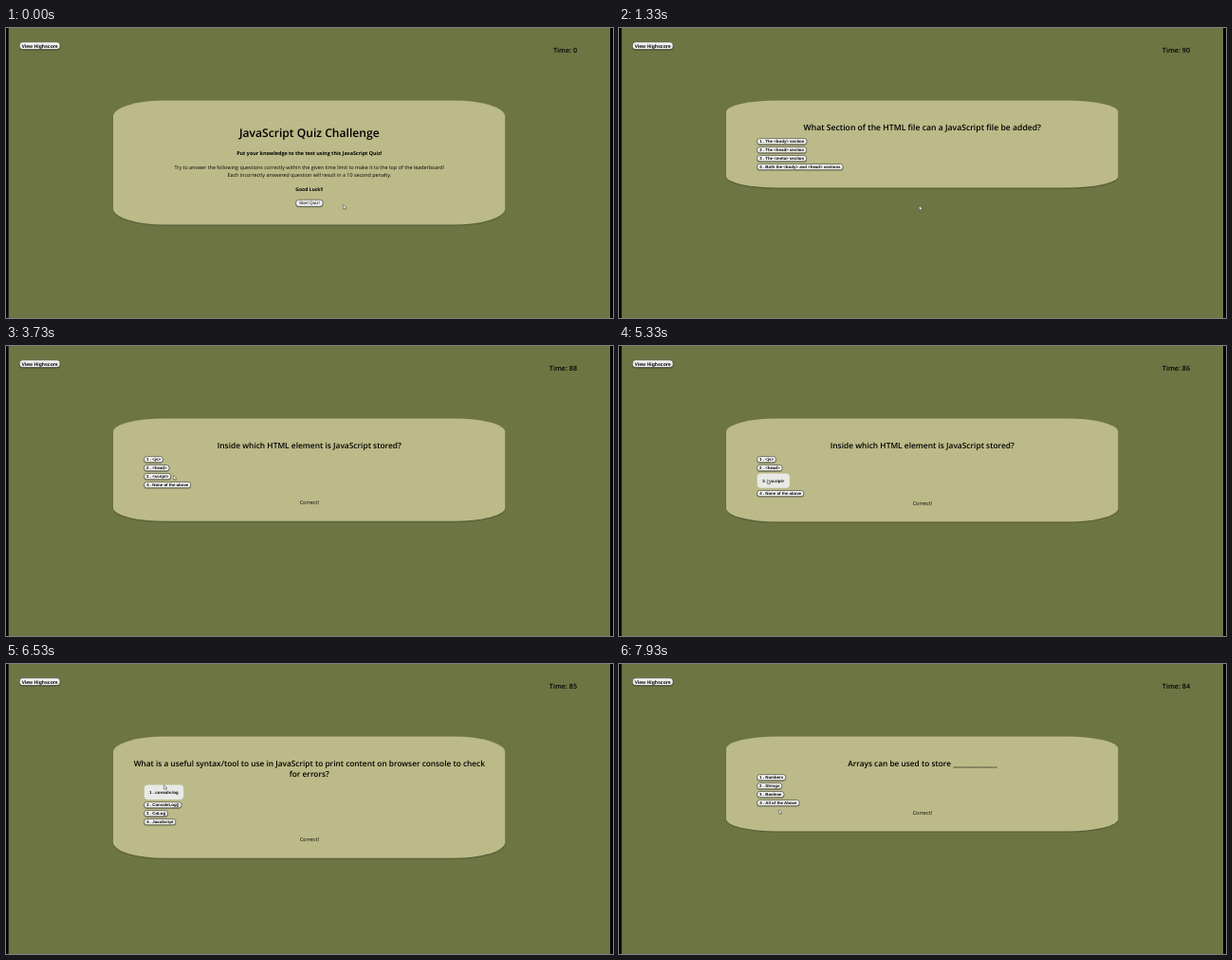
An HTML page for the animation above (8 s loop, 640x306 px).

```html
<!DOCTYPE html>
<html lang="en">
<head>
<meta charset="utf-8">
<title>Quiz</title>
<style>
html, body { margin: 0; width: 100%; height: 100%; overflow: hidden; background: #6d7543; }
svg { display: block; width: 100%; height: 100%; }
text { font-family: "Open Sans", "Noto Sans", sans-serif; text-rendering: geometricPrecision; }
.ui { font-family: "Liberation Sans", Arial, sans-serif; }
</style>
</head>
<body>
<svg viewBox="0 0 640 306">
  <rect width="640" height="306" fill="#6d7543"/>
  <path d="M0 0H2.7V306H0ZM637 0H640V306H637Z"/>
  <g id="scene"></g>
  <path id="cursor" d="M0 0V4.7L1.2 3.7L2 5.3L2.8 4.9L2 3.4H3.5Z" fill="#f4f4f4" stroke="#333" stroke-width=".45"/>
</svg>
<script>
const LOOP = 8000, START = 1330;
const scene = document.getElementById('scene');
const cursor = document.getElementById('cursor');
const ruler = document.createElement('canvas').getContext('2d');

const questions = [
  { from: START, size: 8.65, lines: ['What Section of the HTML file can a JavaScript file be added?'],
    answers: ['The <body> section', 'The <head> section', 'The <meta> section', 'Both the <body> and <head> sections'] },
  { from: 3060, size: 8.4, lines: ['Inside which HTML element is JavaScript stored?'],
    answers: ['<js>', '<head>', '<script>', 'None of the above'] },
  { from: 5860, size: 8.3, lines: ['What is a useful syntax/tool to use in JavaScript to print content on browser console to check', 'for errors?'],
    answers: ['console.log', 'ConsoleLog()', 'CoLog', 'JavaScript'] },
  { from: 6730, size: 8.3, lines: ['Arrays can be used to store _____________'],
    answers: ['Numbers', 'Strings', 'Boolean', 'All of the Above'] }
];

// [time, hovered button], -1 for none
const hovers = [[0, -1], [420, 0], [START, -1], [2880, 3], [3060, -1], [3830, 2], [5860, 1], [6400, 0], [6730, 1], [7400, -1]];

// [time, x, y] of the pointer
const path = [[0, 357, 189], [60, 357, 189], [800, 318, 190], [1630, 318, 190], [2460, 208, 152], [2800, 208, 152],
  [2950, 206, 147], [3150, 206, 147], [3730, 178, 139], [3930, 158, 143.5], [6150, 158, 143.5],
  [6530, 168, 130], [7100, 168, 130], [7930, 170, 156], [LOOP, 170, 156]];

const latest = (list, t) => list.filter(k => k[0] <= t).pop();
const escapeText = s => s.replace(/&/g, '&amp;').replace(/</g, '&lt;');

function text(str, x, y, size, weight = 400, anchor = 'middle', cls = '') {
  return `<text class="${cls}" x="${x}" y="${y}" font-size="${size}" font-weight="${weight}" text-anchor="${anchor}">${escapeText(str)}</text>`;
}

function box(x, y, w, h, rx, ry, style) {
  return `<rect x="${x}" y="${y}" width="${w}" height="${h}" rx="${rx}" ry="${ry}" ${style}/>`;
}

function card(bottom) {
  const h = bottom - 76.5;
  const shape = (dy, grow, style) => box(113 - grow, 76.5 + dy, 413.3 + 2 * grow, h, '13%', h * .13, style)
    .replace('13%', 53.7);
  return shape(1.4, .4, 'fill="#000" opacity=".1"') + shape(.8, 0, 'fill="#000" opacity=".14"') + shape(0, 0, 'fill="#bbba88"');
}

function button(str, x, y, w, h, size, weight, big) {
  const label = text(str, x + w / 2, y + h / 2 + size * .35, size, weight, 'middle', 'ui');
  if (big) return box(x, y, w, h, 4, 4, 'fill="#e9e9e7"') + label;
  const r = h * .42;
  return box(x - .2, y + .7, w + .4, h + .2, r, r, 'fill="#000" opacity=".35"') +
    box(x, y, w, h, r, r, 'fill="#f1f1ef" stroke="#34372a" stroke-width=".6"') + label;
}

function intro(hover) {
  const big = hover === 0;
  const start = big ? [302.5, 181.3, 35, 16] : [305.7, 181.3, 28.4, 7];
  return card(big ? 216.5 : 207.5) +
    text('JavaScript Quiz Challenge', 319.8, 115.2, 12.1, 600) +
    text('Put your knowledge to the test using this JavaScript Quiz!', 319.8, 134, 5.37, 700) +
    text('Try to answer the following questions correctly within the given time limit to make it to the top of the leaderboard!', 319.8, 149.2, 5.39) +
    text('Each incorrectly answered question will result in a 10 second penalty.', 319.8, 156.9, 5.39) +
    text('Good Luck!!', 319.8, 171.9, 5, 700) +
    button('Start Quiz!', ...start, 4.66, 400, big);
}

function quiz(q, hover, t) {
  const wrap = 11 * (q.lines.length - 1);
  const answered = q !== questions[0];
  const roomy = (t >= 3060 && t < 5060) || (t >= 5860 && t < 7860);
  const bottom = 168.5 + wrap + (hover >= 0 ? 9 : 0) + (answered ? 8 : 0) + (roomy ? 8.3 : 0);
  let out = card(bottom);
  q.lines.forEach((line, i) => out += text(line, 319.8, 108.1 + 11 * i, q.size, 600));
  let y = 116.6 + wrap;
  q.answers.forEach((answer, i) => {
    const big = i === hover, label = `${i + 1} . ${answer}`;
    ruler.font = 'bold 44px "Liberation Sans", Arial, sans-serif';
    const w = ruler.measureText(label).width / 10 + (big ? 11 : 4.8);
    out += button(label, 145.7, y, w, big ? 15.3 : 6.2, 4.4, 700, big);
    y += big ? 18 : 8.95;
  });
  if (answered) out += text('Correct!', 319.8, bottom - 18, 5.5);
  return out;
}

function pointer(t) {
  const i = path.findIndex(k => k[0] > t);
  const [t0, x0, y0] = path[i - 1], [t1, x1, y1] = path[i];
  const p = (t - t0) / (t1 - t0), e = p * p * (3 - 2 * p);
  return [x0 + (x1 - x0) * e - 1.5, y0 + (y1 - y0) * e - 2.5];
}

let shown = '';
function draw(now) {
  const t = now % LOOP;
  const hover = latest(hovers, t)[1];
  const q = questions.filter(k => k.from <= t).pop();
  const time = q ? 90 - Math.floor((t - START) / 1000) : 0;
  const next = button('View Highscore', 14.2, 14.8, 42.8, 7.8, 5.17, 700) +
    text('Time: ' + time, 602, 26.1, 7.2, 600, 'end') +
    (q ? quiz(q, hover, t) : intro(hover));
  if (next !== shown) scene.innerHTML = shown = next;
  cursor.setAttribute('transform', `translate(${pointer(t)})`);
  requestAnimationFrame(draw);
}
draw(0);
</script>
</body>
</html>
```
